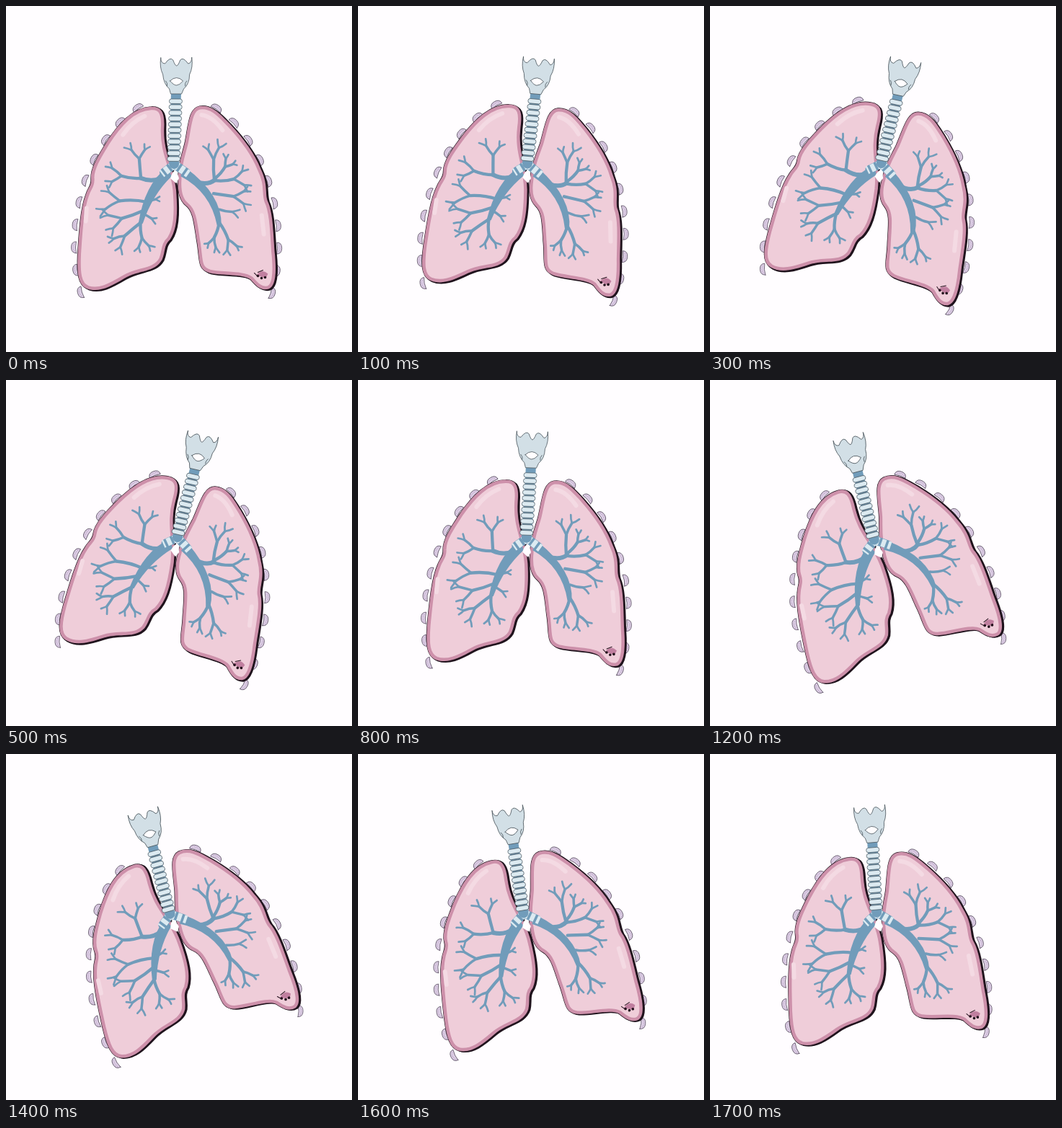
Recreate the animation shown at these times as an HTML page. Size 480 by 480 pixels, loop 1800 ms.

```html
<!DOCTYPE html>
<html lang="en">
<head>
<meta charset="utf-8">
<title>Swinging lungs</title>
<style>
html, body { margin: 0; height: 100%; overflow: hidden; background: #fffdff; }
svg { display: block; width: 100vw; height: 100vh; }
path { stroke-linecap: round; stroke-linejoin: round; }
.shadow { fill: #20131d; stroke: #20131d; stroke-width: 1.6; }
.flesh { fill: #efcdd9; stroke: #20131d; stroke-width: 1.4; }
.rim { fill: none; stroke: #cd90aa; stroke-width: 9; }
.glow { fill: none; stroke: #f4dae3; stroke-width: 6; }
.rib { fill: #dccde4; stroke: #5c5064; stroke-width: .8; }
.speck { fill: none; stroke: #a78fb5; stroke-dasharray: .1 2.4; }
.airway { fill: none; stroke: #719cba; }
.cuff { fill: none; stroke: #dceaf1; stroke-width: 11; stroke-dasharray: 6 3.5; stroke-linecap: butt; }
.ring { fill: #dceaf1; stroke: #46535c; stroke-width: .7; }
.larynx { fill: #d2dfe6; stroke: #4b565d; stroke-width: .8; }
.gap { fill: #fffdff; }
</style>
</head>
<body>
<svg viewBox="0 0 480 480">
  <g id="body">
    <g id="ribs"></g>
    <use href="#ribs" transform="matrix(-1 0 0 1 474 0)" />
    <g id="lungs"></g>
    <path class="glow" d="M192 153Q174 161 162 179M112 281L111 299M271 151Q286 153 300 172M355 290L358 316" />

    <g id="bronchi" class="airway">
      <path fill="#719cba" stroke="none" d="M223 224Q192 248 184 302H190Q203 262 230 236ZM242 236Q284 258 293 304H299Q300 262 250 225Z" />
      <path stroke-width="6" d="M214 239Q202 245 187 239M264 244Q280 249 290 241" />
    </g>

    <path class="airway" stroke-width="12" d="M233 220L219 231M234 220L250 231" />
    <path class="cuff" d="M233 220L216 233M234 220L253 233" />
    <path class="gap" d="M228 239Q234 219 240 239L236 246Z" />
    <path class="airway" stroke-width="14" stroke-linecap="butt" d="M235.5 118L233 219" />
    <g id="rings"></g>

    <g class="larynx" transform="translate(-1 0)">
      <path d="M215 72Q215 80 221 80Q228 70 232 75Q235 83 237 83Q239 83 242 75Q246 70 253 80Q258 79 258 71Q260 85 255 95Q255 108 247 115L244 122H229L227 115Q219 108 218 95Q213 85 215 72Z" />
      <path class="gap" d="M228 104Q237 95 246 104Q241 110 237 110Q233 110 228 104Z" />
      <path fill="none" d="M222 104Q225 107 224 111M251 104Q248 107 249 111" />
    </g>

    <path fill="#c07f9f" d="M348 373Q356 363 364 371L361 377Z" />
    <path fill="none" stroke="#24121d" stroke-width="3.6" d="M350 374h.1M355 377h.1M360 376h.1" />
    <path fill="none" stroke="#24121d" d="M345 370L349 374M350 369L357 366" />
  </g>
</svg>
<script>
const $ = id => document.getElementById(id);
const radians = degrees => degrees * Math.PI / 180;

function path(parent, attributes) {
  const node = document.createElementNS('http://www.w3.org/2000/svg', 'path');
  for (const name in attributes) node.setAttribute(name, attributes[name]);
  parent.append(node);
  return node;
}

const lungs = [
  'M201 140C217 139 220 151 219 170C218 205 232 220 236 255C239 290 237 310 228 324C219 332 222 340 217 352C207 370 185 366 165 378C145 390 130 398 114 393C100 388 99 370 100 345C102 310 104 280 111 262C114 252 119 250 118 240C117 225 130 205 139 190C155 165 175 141 201 140Z',
  'M268 139C285 136 297 150 310 163C330 184 345 205 353 225C364 247 359 258 363 270C370 284 371 310 373 340C377 375 373 389 365 392C354 395 347 387 340 379C330 371 300 374 283 370C265 365 270 350 265 325C261 300 260 285 250 277C240 269 238 255 239 240C238 222 245 203 248 190C253 165 253 142 268 139Z'
];
lungs.forEach((d, i) => {
  $('lungs').innerHTML += `<clipPath id="clip${i}"><path d="${d}"/></clipPath>
    <path class="shadow" d="${d}" transform="translate(2.2 1.2)"/>
    <path class="flesh" d="${d}"/>
    <path class="rim" d="${d}" clip-path="url(#clip${i})"/>`;
});

// Ribs sit at equal steps along one curve; the other side mirrors them.
const guide = path($('ribs'), { d: 'M104 398C88 345 95 285 110 241C122 205 145 165 182 141', fill: 'none' });
const ribCount = 10, ribStep = guide.getTotalLength() / (ribCount - 1);
for (let i = 0; i < ribCount; i++) {
  const a = guide.getPointAtLength(i * ribStep - 5), p = guide.getPointAtLength(i * ribStep), b = guide.getPointAtLength(i * ribStep + 5);
  const turn = Math.atan2(b.y - a.y, b.x - a.x) * 180 / Math.PI;
  const transform = `translate(${p.x} ${p.y}) rotate(${turn})`;
  path($('ribs'), { class: 'rib', transform, d: 'M-8 3Q-8 -4 0 -4Q8 -4 8 3Q0 1 -8 3Z' });
  path($('ribs'), { class: 'speck', transform, d: 'M-5 0Q0 -3 5 0' });
}

let seed = 7;
const random = () => (seed = seed * 16807 % 2147483647) / 2147483647;

// A slightly bent twig that forks until its depth is used up.
function branch(x, y, heading, length, depth) {
  const bend = radians(heading + random() * 24 - 12), turn = radians(heading);
  const endX = x + length * Math.cos(turn), endY = y + length * Math.sin(turn);
  path($('bronchi'), {
    'stroke-width': 1.9 + depth * .8,
    d: `M${x} ${y}Q${x + length / 2 * Math.cos(bend)} ${y + length / 2 * Math.sin(bend)} ${endX} ${endY}`
  });
  if (depth > 1) for (const side of [-1, 1])
    branch(endX, endY, heading + side * (24 + random() * 14), length * (.5 + random() * .16), depth - 1);
}

// Start x, start y, heading in degrees, length, depth
[
  [188, 239, 186, 28, 3], [187, 238, -95, 26, 3], [195, 272, 182, 37, 3], [191, 284, 160, 32, 3],
  [188, 300, 140, 30, 3], [187, 300, 85, 22, 3], [190, 288, 30, 14, 2], [198, 270, -10, 10, 2],
  [289, 241, -92, 28, 3], [291, 238, -50, 20, 3], [290, 242, -5, 26, 3], [288, 260, 8, 28, 3],
  [296, 282, 10, 18, 2], [296, 300, 62, 27, 3], [296, 300, 108, 22, 3]
].forEach(root => branch(...root));

for (let i = 0; i < 11; i++)
  $('rings').innerHTML += `<rect class="ring" x="${226 - i * .25}" y="${129 + i * 8}" width="18" height="6.4" rx="3"/>`;

function draw() {
  const t = Math.floor(performance.now() % 1800 / 100) / 18;
  const angle = -1.4 + 15 * Math.sin(2 * Math.PI * t + .11);
  $('body').setAttribute('transform', `rotate(${angle} 240 240)`);
  requestAnimationFrame(draw);
}
draw();
</script>
</body>
</html>
```
